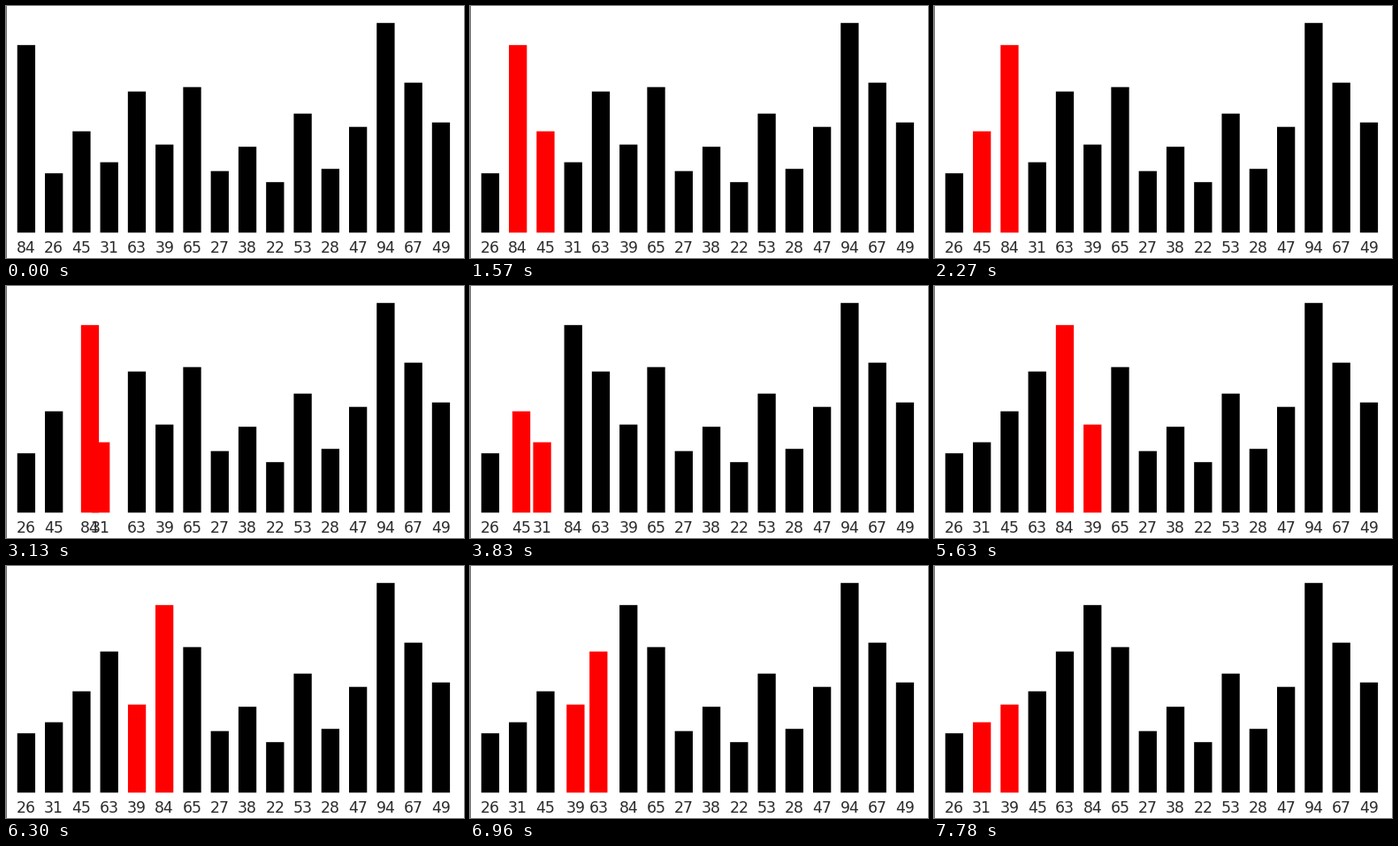
Recreate the animation shown at these times as a matplotlib script. Size 518 by 285 pixels, loop 8000 ms.

```python
import matplotlib.pyplot as plt
from matplotlib.animation import FuncAnimation
from matplotlib.patches import Rectangle

W, H, DPI = 518, 285, 100
LOOP, STEP = 8000, 20
LEFT, PITCH, BAR_W, BASE = 12.75, 31.27, 20.3, 256.3
VALUES = [84, 26, 45, 31, 63, 39, 65, 27, 38, 22, 53, 28, 47, 94, 67, 49]

# The picture refreshes once per tick; WAIT, MOVE and FIRST count ticks
START, TICK = 870, 138.2
FIRST, WAIT, MOVE = -0.86, 2.44, 3


def insertion_sort(values):
    """Yield (start tick, order, left slot, swaps) for every comparison."""
    order = list(range(len(values)))
    tick = FIRST
    for i in range(1, len(order)):
        for k in range(i - 1, -1, -1):
            a, b = order[k], order[k + 1]
            swaps = values[a] > values[b]
            yield tick, order.copy(), k, swaps
            tick += WAIT
            if not swaps:
                break
            tick += MOVE
            order[k], order[k + 1] = b, a


def smooth(u):
    u = min(max(u, 0), 1)
    return u * u * (3 - 2 * u)


COMPARES = list(insertion_sort(VALUES))


def layout(ms):
    """Slot position of every bar, and the pair being compared."""
    tick = (ms - START) // TICK
    if tick < 0:
        return list(range(len(VALUES))), ()
    begin, order, k, swaps = [c for c in COMPARES if c[0] <= tick][-1]
    pos = [order.index(n) for n in range(len(VALUES))]
    a, b = order[k], order[k + 1]
    if swaps:
        shift = smooth((tick - begin - WAIT) / MOVE)
        pos[a] += shift
        pos[b] -= shift
    return pos, (a, b)


fig = plt.figure(figsize=(W / DPI, H / DPI), dpi=DPI, facecolor="white")
ax = fig.add_axes([0, 0, 1, 1])
ax.set_xlim(0, W)
ax.set_ylim(H, 0)
ax.axis("off")
ax.add_patch(Rectangle((0, 0), 1, H, color="#6e6e6e", lw=0))

bars, labels = [], []
for v in VALUES:
    height = 2.5 * v + 2.1
    bars.append(ax.add_patch(Rectangle((0, BASE - height), BAR_W, height,
                                       fc="black", lw=0, snap=False)))
    labels.append(ax.text(0, 279, str(v), family="DejaVu Sans",
                          size=17.2 * 72 / DPI, color="#2a2a2a",
                          ha="center", va="baseline"))


def update(i):
    pos, active = layout((i + 0.5) * STEP)
    for n, (bar, label) in enumerate(zip(bars, labels)):
        x = LEFT + PITCH * pos[n]
        bar.set_x(x)
        bar.set_facecolor("red" if n in active else "black")
        label.set_x(x + BAR_W / 2)
    return bars + labels


anim = FuncAnimation(fig, update, frames=LOOP // STEP, interval=STEP,
                     repeat=True, repeat_delay=0, blit=False)
plt.show()
```
